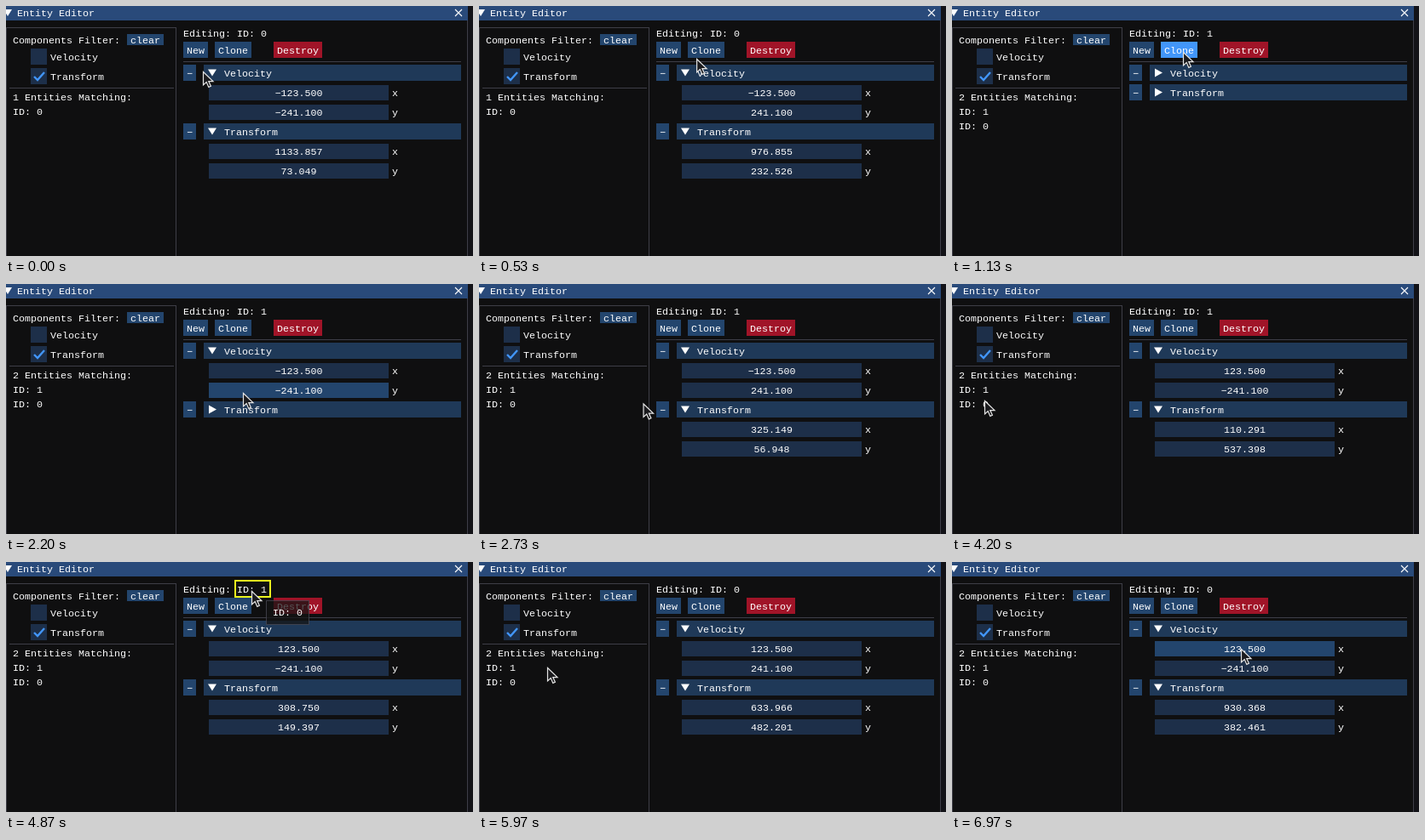
An HTML page with a canvas for the animation above (7010 ms loop, 548 by 294 pixels).

```html
<!DOCTYPE html>
<html lang="en">
<head>
<meta charset="utf-8">
<title>Entity Editor</title>
<style>
html, body { margin: 0; width: 100%; height: 100%; overflow: hidden; background: #0f0f10; }
canvas { display: block; }
</style>
</head>
<body>
<canvas id="stage" width="548" height="294"></canvas>
<script>
const g = document.getElementById('stage').getContext('2d');
const LOOP = 7010, CLONE = 950, OPEN_VELOCITY = 1680, OPEN_TRANSFORM = 2480;
const DRAG = 4420, DROP = 5250, OVER_TARGET = 4680;
const BUTTON = '#23456d', HOVER = '#4296fa', HEADER = '#1f3958', HEADER_HOVER = '#387bcb';
const FIELD = '#1d2f49', FIELD_HOVER = '#23456d', LINE = '#3e3e47';

// Mouse path: time, x, y
const path = [
  [0, 231, 77], [120, 231, 77], [800, 268, 54], [1130, 271, 54], [1280, 271, 54],
  [1580, 243, 77], [1760, 243, 77], [2080, 276, 122], [2200, 278, 128], [2420, 243, 146],
  [2600, 243, 146], [2930, 96, 130], [3250, 41, 124], [3370, 41, 124], [3720, 37, 125],
  [4050, 38, 137], [4420, 38, 137], [4760, 284, 36], [4870, 288, 34], [5260, 288, 34],
  [5720, 90, 121], [5970, 80, 124], [6150, 81, 124], [6560, 332, 101], [6970, 339, 102]
];

// Body position with the wall bounces unfolded: time, x, y
const H = 722;
const flight = [
  [0, 1133.857, 73.049], [3370, 135.562, -2 * H - 425.944], [4870, -308.75, -4 * H + 149.397],
  [5970, -633.966, -4 * H - 482.201], [6970, -930.368, -6 * H + 382.461]
];

const linear = k => k, smooth = k => k * k * (3 - 2 * k);

function along(keys, t, ease) {
  let i = 1;
  while (i < keys.length - 1 && keys[i][0] < t) i++;
  const a = keys[i - 1], b = keys[i];
  const k = ease(Math.min(1, (t - a[0]) / (b[0] - a[0])));
  return [a[1] + (b[1] - a[1]) * k, a[2] + (b[2] - a[2]) * k];
}

function body(t) {
  const [ux, uy] = along(flight, t, linear);
  const d = Math.abs(uy) % (2 * H);
  return {
    x: Math.abs(ux), y: d < H ? d : 2 * H - d,
    vx: ux > 0 ? -123.5 : 123.5, vy: uy < 0 && d < H ? 241.1 : -241.1
  };
}

let mouse, dragging;

function rect(x, y, w, h, color) {
  g.fillStyle = color;
  g.fillRect(x, y, w, h);
}

function frame(x, y, w, h, color) {
  g.strokeStyle = color;
  g.strokeRect(x + .5, y + .5, w - 1, h - 1);
}

function text(s, x, cy, align = 'left') {
  g.fillStyle = '#fff';
  g.textAlign = align;
  g.fillText(s, x, cy + 4);
}

function poly(points, color) {
  g.fillStyle = color;
  g.beginPath();
  points.forEach(([x, y]) => g.lineTo(x, y));
  g.closePath();
  g.fill();
}

function stroke(points, color, width) {
  g.strokeStyle = color;
  g.lineWidth = width;
  g.beginPath();
  points.forEach(([x, y]) => g.lineTo(x, y));
  g.stroke();
  g.lineWidth = 1;
}

function hot(x, y, w, h, color, over) {
  const [mx, my] = mouse;
  const inside = !dragging && mx > x && mx < x + w && my >= y && my < y + h;
  rect(x, y, w, h, inside ? over : color);
}

function button(s, x, y, h = 19, color = BUTTON, over = HOVER) {
  hot(x, y, s.length * 7 + 8, h, color, over);
  text(s, x + 4, y + Math.ceil(h / 2));
}

function arrow(x, y, open) {
  poly(open ? [[x - 5, y - 4], [x + 5, y - 4], [x, y + 4]]
            : [[x - 4, y - 5], [x + 5, y], [x - 4, y + 5]], '#fff');
}

function field(value, name, y) {
  hot(238, y, 211, 18, FIELD, FIELD_HOVER);
  text(value.toFixed(3).replace('-', '−'), 343.5, y + 9, 'center');
  text(name, 453, y + 9);
}

// Draws one component and returns the y of the next
function component(name, y, open, vx, vy) {
  button('−', 208, y);
  hot(232, y, 302, 19, HEADER, HEADER_HOVER);
  arrow(242, y + 9.5, open);
  text(name, 256, y + 10);
  if (!open) return y + 23;
  field(vx, 'x', y + 24);
  field(vy, 'y', y + 47);
  return y + 69;
}

function checkbox(name, y, checked) {
  hot(29, y, 19, 19, FIELD, FIELD_HOVER);
  if (checked) stroke([[33, y + 10], [37, y + 14], [45, y + 5]], HOVER, 2.4);
  text(name, 52, y + 10);
}

function cursor([x, y]) {
  g.save();
  g.translate(x, y);
  const shape = new Path2D('M.5 .5V16L4.2 12.6L6.8 18.4L9.4 17.2L6.8 11.6H12Z');
  g.fillStyle = '#1b1b1e';
  g.strokeStyle = '#e4e4e4';
  g.lineWidth = 1.2;
  g.fill(shape);
  g.stroke(shape);
  g.restore();
}

function tooltip([mx, my]) {
  const x = Math.round(mx) + 17, y = Math.round(my) + 11;
  rect(x, y, 51, 29, 'rgba(20,20,20,.72)');
  frame(x, y, 51, 29, 'rgba(110,110,128,.45)');
  text('ID: 0', x + 8, y + 14);
}

function draw(t) {
  const cloned = t >= CLONE, id = cloned && t < DROP ? 1 : 0;
  const b = body(t);
  mouse = along(path, t, smooth);
  dragging = t >= DRAG && t < DROP;
  g.font = '11.67px "Liberation Mono", monospace';

  rect(0, 0, 548, 294, '#0f0f10');
  rect(542, 0, 6, 294, '#121217');
  rect(0, 0, 542, 17, '#294a7a');
  rect(541, 17, 1, 277, LINE);
  arrow(2, 8, true);
  text('Entity Editor', 13, 8);
  stroke([[527, 4], [535, 12]], '#fff', 1.1);
  stroke([[535, 4], [527, 12]], '#fff', 1.1);

  frame(0, 25, 200, 280, LINE);
  text('Components Filter:', 8, 40);
  button('clear', 142, 33, 13);
  checkbox('Velocity', 50, false);
  checkbox('Transform', 73, true);
  rect(4, 96, 193, 1, LINE);
  text((cloned ? 2 : 1) + ' Entities Matching:', 8, 107);
  text(cloned ? 'ID: 1' : 'ID: 0', 8, 124);
  if (cloned) text('ID: 0', 8, 141);

  text('Editing: ID: ' + id, 208, 32);
  button('New', 208, 42);
  button('Clone', 245, 42);
  button('Destroy', 314, 42, 19, '#a01428', '#c81e32');
  rect(208, 65, 326, 1, LINE);
  const next = component('Velocity', 69, !cloned || t >= OPEN_VELOCITY, b.vx, b.vy);
  component('Transform', next, !cloned || t >= OPEN_TRANSFORM, b.x, b.y);

  if (dragging) {
    if (t >= OVER_TARGET) {
      g.lineWidth = 2;
      g.strokeStyle = '#ebf51e';
      g.strokeRect(269, 22, 41, 19);
      g.lineWidth = 1;
    }
    tooltip(mouse);
  }
  cursor(mouse);
}

// 30 pictures per second, on a 10 ms grid
function tick() {
  const n = Math.min(209, Math.floor((performance.now() % LOOP + 3.4) * .03));
  draw(Math.round(n * 10 / 3) * 10);
  requestAnimationFrame(tick);
}
tick();
</script>
</body>
</html>
```
